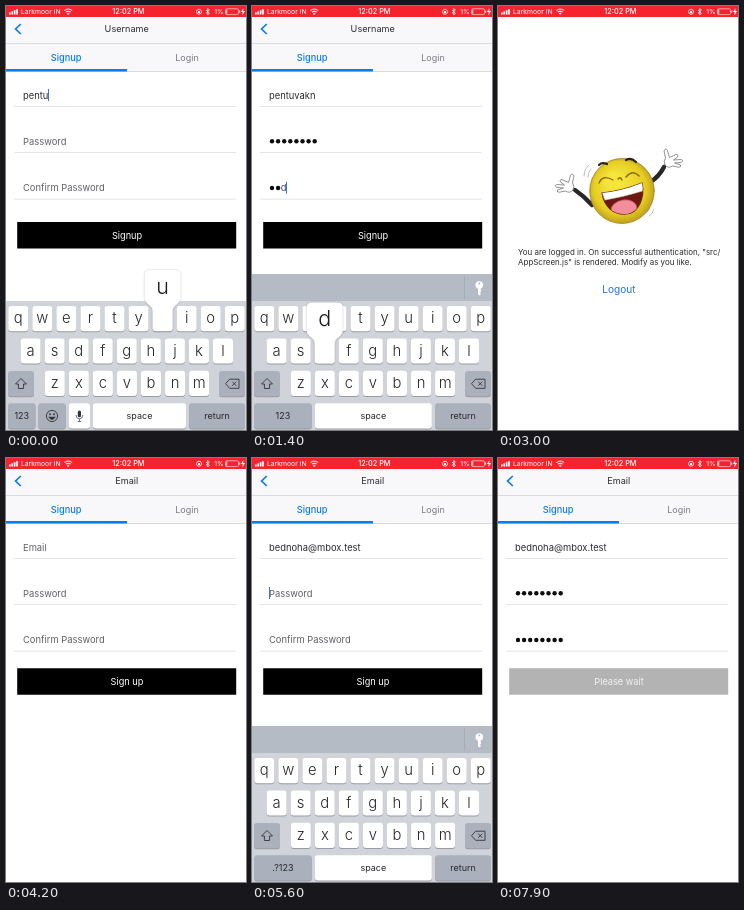
These frames come from a looping animation (240x424 px, 8 s). An HTML page with a canvas:

```html
<!DOCTYPE html>
<html lang="en">
<head>
<meta charset="utf-8">
<title>Signup demo</title>
<style>
html, body { margin: 0; width: 100%; height: 100%; overflow: hidden; background: #fff; }
canvas { display: block; width: 240px; height: 424px; }
</style>
</head>
<body>
<canvas></canvas>
<script>
const canvas = document.querySelector('canvas');
const c = canvas.getContext('2d');
const dpr = window.devicePixelRatio || 1;
canvas.width = 240 * dpr;
canvas.height = 424 * dpr;

const BLUE = '#087cf0', INK = '#2b2b30', W = 240, H = 424;
const USER = 'pentuvakn', MAIL = 'bednoha@mbox.test', SECRET = 'asdasdas';
const ROWS = ['qwertyuiop', 'asdfghjkl', 'zxcvbnm'];

function text(s, x, y, size, color = INK, align = 'left', weight = 400) {
  c.font = `${weight} ${size}px Inter, "Liberation Sans", sans-serif`;
  c.fillStyle = color;
  c.textAlign = align;
  c.fillText(s, x, y);
}
const mid = (s, x, y, size, color, weight) => text(s, x, y, size, color, 'center', weight);

function rect(x, y, w, h, color, r = 0) {
  c.fillStyle = color;
  c.beginPath();
  c.roundRect(x, y, w, h, r);
  c.fill();
}

function shape(d, stroke, width = 1, fill) {
  const p = new Path2D(d);
  if (fill) { c.fillStyle = fill; c.fill(p); }
  if (stroke) { c.strokeStyle = stroke; c.lineWidth = width; c.stroke(p); }
}

function oval(x, y, rx, ry, fill, stroke, turn = 0) {
  c.beginPath();
  c.ellipse(x, y, rx, ry, turn, 0, 7);
  if (fill) { c.fillStyle = fill; c.fill(); }
  if (stroke) { c.strokeStyle = stroke; c.lineWidth = 0.8; c.stroke(); }
}

function shifted(x, y, draw) {
  c.save();
  c.translate(x, y);
  draw();
  c.restore();
}

function statusBar() {
  rect(0, 0, W, 11, '#f4232e');
  for (let i = 0; i < 4; i++) rect(3 + i * 2.4, 6.5 - i * 1.2, 1.7, 2 + i * 1.2, '#fff');
  text('Larkmoor IN', 15, 8.3, 6.8, '#fff');
  shape('M58.5 4.6Q62.3 1.4 66.1 4.6M60 6.2Q62.3 4.3 64.6 6.2', '#fff', 1.1);
  oval(62.3, 7.8, 1, 1, '#fff');
  mid('12:02 PM', 122.4, 8.4, 7.3, '#fff', 500);
  oval(193, 5.7, 2.5, 2.5, null, '#fff');
  rect(192, 5, 2, 2, '#fff');
  shape('M200 4L203.4 7.2L201.7 9V2.4L203.4 4.2L200 7.4', '#fff', 0.8);
  text('1%', 208.2, 8.3, 6.8, '#fff');
  c.strokeStyle = '#ffd9da';
  c.lineWidth = 0.7;
  c.beginPath();
  c.roundRect(219.5, 2.8, 13, 5.8, 1.3);
  c.stroke();
  rect(233.2, 4.6, 1, 2.2, '#ffd9da');
  rect(220.3, 3.6, 0.9, 4.2, '#fff');
  shape('M237.4 2L235 6H236.8L236.2 9.4L239 5H237.2Z', null, 1, '#fff');
}

// counts[i] is the number of characters present at step start + i
function typing(k, start, counts) {
  const i = k - start;
  return { n: i < 0 ? 0 : counts[Math.min(i, counts.length - 1)], active: i >= 0 && i < counts.length };
}

function stateAt(k) {
  const mail = k >= 39;
  const name = mail ? typing(k, 46, [2, 4, 6, 7, 8, 11, 14, 17])
    : k < 30 ? typing(k, 0, [5, 6, 7, 8, 9]) : { n: 0 };
  const pass = mail ? typing(k, 57, [2, 4, 6, 8])
    : k < 30 ? typing(k, 6, [1, 2, 3, 4, 6, 8]) : { n: 0 };
  const conf = mail ? typing(k, 63, [2, 3, 4, 6, 7, 8])
    : k < 30 ? typing(k, 13, [2, 3, 5, 7, 8]) : { n: 0 };
  const word = mail ? MAIL : USER;
  let focus = -1;
  if (k < 20) focus = k < 5 ? 0 : k < 12 ? 1 : 2;
  if (k >= 43 && k < 70) focus = k < 56 ? 0 : k < 62 ? 1 : 2;

  let pressed = '';
  if (name.active) pressed = word[name.n - 1];
  for (const f of [pass, conf]) if (f.active && f.n < 8) pressed = SECRET[f.n - 1];

  let drop = focus < 0 ? H : 0;
  if (k >= 20 && k < 22) drop = [30, 100][k - 20];
  if (k >= 43 && k < 45) drop = [95, 35][k - 43];
  if (k >= 70 && k < 73) drop = [0, 40, 105][k - 70];

  return {
    mail, word, name, pass, conf, focus, pressed, drop,
    wait: (k >= 20 && k < 30) || k >= 70,
    bar: mail ? focus === 1 : focus > 0,
    layout: focus === 0 ? (mail ? 'mail' : 'plain') : 'secret'
  };
}

function field(y, label, value, secret, plainTail, focused) {
  rect(8, y + 11, 222, 0.8, '#dcdce0');
  let end = 17;
  if (!value) text(label, 17, y + 3.6, 9.4, '#626067');
  else if (secret) {
    const dots = value.length - (plainTail ? 1 : 0);
    for (let i = 0; i < dots; i++) oval(20 + i * 6.1, y + 0.3, 2.2, 2.2, '#0c0c0e');
    end += dots * 6.1;
    if (plainTail) {
      const tail = value.slice(-1);
      text(tail, end - 0.5, y + 3.6, 9.4, '#3d4a6b');
      end += c.measureText(tail).width - 0.5;
    }
  } else {
    text(value, 17, y + 3.6, 9.4);
    end += c.measureText(value).width;
  }
  if (focused) rect(Math.floor(end), y - 6, 1, 12, '#3d72dc');
}

function form(s) {
  rect(0, 66, W, H - 66, '#fff');
  const hidden = (f) => SECRET.slice(0, f.n);
  field(89, s.mail ? 'Email' : 'Username', s.word.slice(0, s.name.n), false, false, s.focus === 0);
  field(135, 'Password', hidden(s.pass), true, s.pass.active && s.pass.n < 8, s.focus === 1);
  field(181.7, 'Confirm Password', hidden(s.conf), true, s.conf.active && s.conf.n < 8, s.focus === 2);
  const y = s.mail ? 210.3 : 216;
  rect(11.2, y, 219, 26.4, s.wait ? '#b4b3b4' : '#000');
  mid(s.wait ? 'Please wait' : s.mail ? 'Sign up' : 'Signup', 121, y + 16.8, 9.2, s.wait ? '#f3f3f3' : '#fff');
}

function header(title) {
  rect(0, 11, W, 55, '#f8f7fa');
  rect(0, 37, W, 0.8, '#d2d1d6');
  shape('M14.8 18L9.6 23L14.8 28', BLUE, 1.7);
  mid(title, 120.7, 26, 9.1, INK);
  mid('Signup', 60.2, 54.7, 9.2, BLUE, 500);
  mid('Login', 181, 54.7, 9, '#7d7c82');
  rect(0, 65, W, 0.8, '#d2d1d6');
  rect(0, 63, 121, 2.6, BLUE);
}

function key(x, y, w, label, dark, size = 9, weight = 400) {
  rect(x, y + 1, w, 25.2, '#989ba2', 3);
  rect(x, y, w, 25.2, dark ? '#abb1bc' : '#fff', 3);
  if (label) mid(label, x + w / 2, y + (size > 9 ? 17.3 : 15.6), size, '#26262b', weight);
}

function popup(x, y, ch) {
  const top = y - 36;
  c.save();
  c.shadowColor = '#0004';
  c.shadowBlur = 2 * dpr;
  shape(`M${x - 13} ${top}h26q5 0 5 5v23c0 6 -8 7 -8 13v17q0 3 -3 3h-14q-3 0 -3 -3v-17c0 -6 -8 -7 -8 -13v-23q0 -5 5 -5z`, null, 1, '#fff');
  c.restore();
  mid(ch, x, top + 24, 21.5, '#1c1c20', 300);
}

function keyboard(s) {
  rect(0, 295, W, 129, '#d0d3da');
  if (s.bar) {
    rect(0, 268, W, 27, '#b5bbc5');
    rect(212, 270, 0.8, 23, '#a2a8b3');
    oval(227.3, 279, 3.8, 3.8, '#fff');
    shape('M226 282V288L227.4 289.5L229 288L228 286.7L229 285.5L228.6 282Z', null, 1, '#fff');
    oval(227.3, 277.6, 1, 1, '#b5bbc5');
  }
  const spots = {};
  ROWS.forEach((row, r) => [...row].forEach((ch, i) => {
    const x = [12.3, 24.6, 48.8][r] + i * 24.05, y = 300 + r * 32.4;
    spots[ch] = [x, y];
    key(x - 10, y, 20, ch, false, 14.8, 300);
  }));

  key(2, 365, 26, '', true);
  shape('M15 372.5L20.5 378H17.6V382.5H12.4V378H9.5Z', '#33353c', 0.9);
  key(213, 365, 26, '', true);
  shape('M219.5 377.7L223.6 373.2H233V382.3H223.6ZM226.2 375.6L230.3 379.8M230.3 375.6L226.2 379.8', '#33353c', 0.9);

  const y = 397.3;
  if (s.layout === 'plain') {
    key(2, y, 27.5, '123', true);
    key(32.3, y, 27.5, '', true);
    oval(46, 410, 5.6, 5.6, null, '#202127');
    oval(44, 408.3, 0.8, 1, '#202127');
    oval(48, 408.3, 0.8, 1, '#202127');
    shape('M42.2 410.8H49.8Q46 417 42.2 410.8Z', null, 1, '#33353c');
    key(62.8, y, 21.2, '', false);
    rect(71.8, 404.5, 3.2, 6.8, '#33353c', 1.6);
    shape('M70 409Q70 412.8 73.4 412.8Q76.8 412.8 76.8 409M73.4 413V415.5M71.6 415.5H75.2', '#33353c', 0.7);
    key(87, y, 93, 'space');
  } else {
    key(2, y, 57.8, s.mail ? '.?123' : '123', true);
    if (s.layout === 'mail') {
      key(62.8, y, 63.5, 'space');
      for (const [ch, x] of [['@', 129.3], ['.', 156.3]]) {
        key(x, y, 24, ch, false, 11);
        spots[ch] = [x + 12, y];
      }
    } else key(62.8, y, 117, 'space');
  }
  key(183, y, 56, 'return', true);
  if (spots[s.pressed]) popup(...spots[s.pressed], s.pressed);
}

// open glove: thumb up, fingers pointing outwards
function hand(x, y, side) {
  shifted(x, y, () => {
    c.scale(side, 1);
    shape('M-5 3Q-7 -1 -4.5 -4L-6 -11Q-4.5 -14.5 -2.5 -11.5L-.5 -4.5L6 -7.5Q9 -7.5 7.5 -5L3.5 -2L11.5 -2.5Q14 -1 11.5 .3L4.5 1L10.5 3Q11.5 5.5 8.5 5.2L2.5 4Q-2 7 -5 3Z', '#77777b', 0.8, '#fff');
  });
}

function smiley() {
  c.lineCap = 'round';
  shape('M94 199Q86 190 77 184M151 177Q161 171 166 161', '#28282b', 4.4);
  hand(70, 181, -1);
  hand(172, 156, 1);
  const skin = c.createRadialGradient(116, 174, 6, 124, 185, 35);
  skin.addColorStop(0, '#f6e63c');
  skin.addColorStop(0.7, '#e5cd22');
  skin.addColorStop(1, '#b6951a');
  oval(124, 185, 32.3, 32.5, skin, '#a0822a');
  shape('M101 159Q104 156 109 158M128 154Q133 151 138 156', '#29251c', 2.2);
  shape('M101 177Q105 168 115 174M128 171Q135 163 141 170M120 173Q122 170 124 174', '#8d6710', 1.4);
  const mouth = 'M104 187Q124 185 144 177C147 191 141 207 128 208C115 209 106 200 104 187Z';
  shape(mouth, '#672018', 1.2, '#6d1714');
  c.save();
  c.clip(new Path2D(mouth));
  oval(126, 203, 13, 9, '#f28d9b', '#c95767', -0.15);
  shape('M103 184L146 175L144.5 185Q125 191 107 194Z', '#cfc8c0', 0.6, '#fff');
  c.restore();
  shape('M86 170Q86 163 91 159M90 171Q90 166 93 163M151 210Q155 208 156 203M148 207Q151 205 152 202', '#aaa', 0.8);
  c.lineCap = 'butt';
}

function welcome(dim) {
  smiley();
  text('You are logged in. On successful authentication, "src/', 20, 249, 7.97);
  text('AppScreen.js" is rendered. Modify as you like.', 20, 259.2, 7.97);
  c.globalAlpha = dim ? 0.3 : 1;
  mid('Logout', 121, 287, 10.1, '#1c72dc');
  c.globalAlpha = 1;
}

function page(s) {
  form(s);
  header(s.mail ? 'Email' : 'Username');
}

function draw(now) {
  const k = Math.floor(now % 8000 / 100);
  c.setTransform(dpr, 0, 0, dpr, 0, 0);
  rect(0, 0, W, H, '#fff');
  const s = stateAt(k);
  if (k >= 30 && k < 38) welcome(k === 37);
  else if (k >= 39 && k < 42) {
    const slide = [150, 55, 14][k - 39];
    shifted((slide - W) * 0.3, 0, () => page(stateAt(38)));
    shifted(slide, 0, () => page(s));
  } else page(s);
  if (s.drop < H) shifted(0, s.drop, () => keyboard(s));
  statusBar();
}

const start = performance.now();
function tick() {
  draw(performance.now() - start);
  requestAnimationFrame(tick);
}
tick();
</script>
</body>
</html>
```
